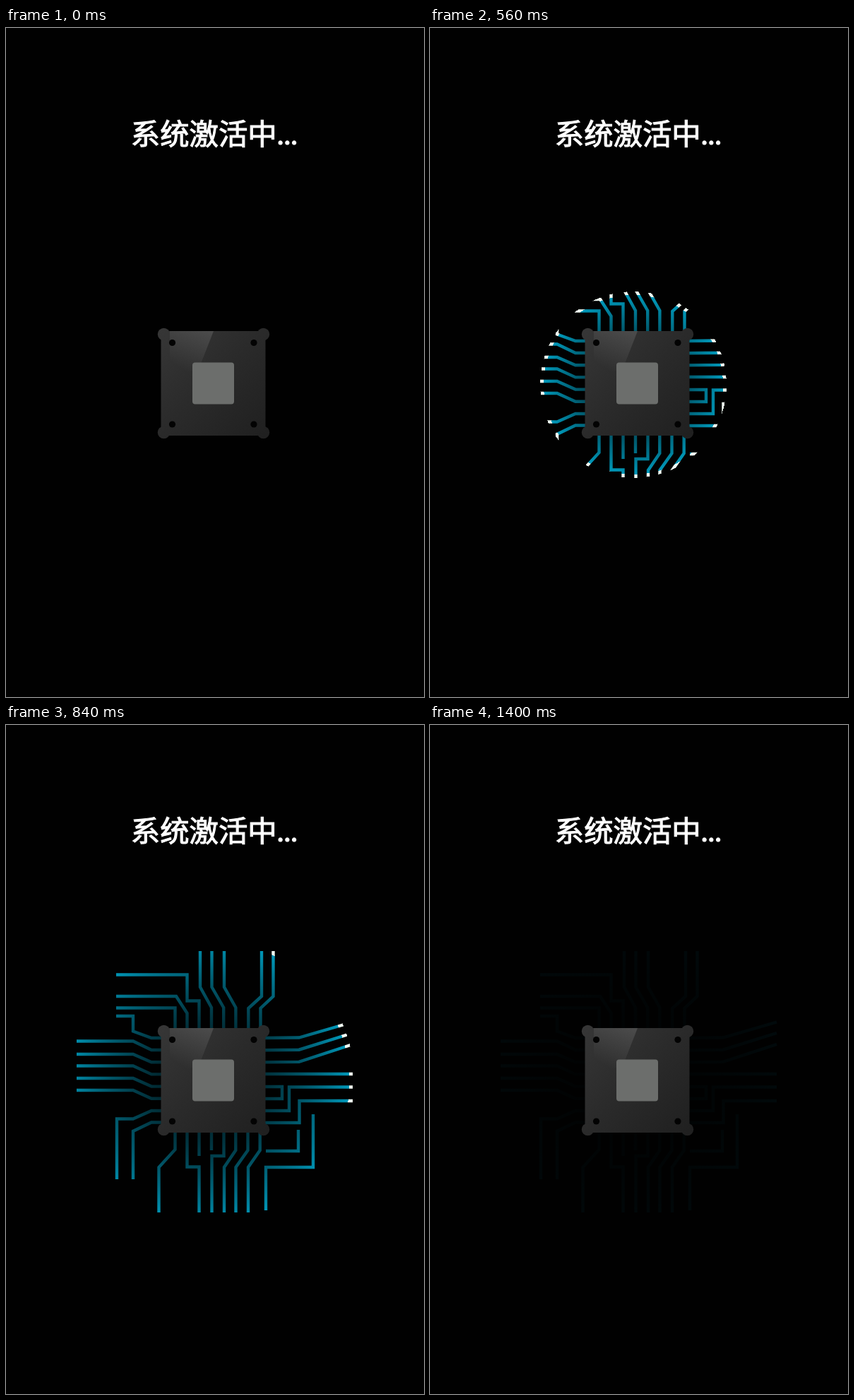
Animation of 592 by 947 pixels, one loop 1440 ms. Source, as an HTML page with a canvas:

```html
<!DOCTYPE html>
<html lang="zh-CN">
<head>
<meta charset="utf-8">
<style>
  html, body { margin: 0; width: 100%; height: 100%; overflow: hidden; background: #010101; }
  canvas { display: block; }
</style>
</head>
<body>
<canvas width="592" height="947"></canvas>
<script>
const ctx = document.querySelector('canvas').getContext('2d');
const LOOP = 1440, STEP = 40, START = 320, FADE = 880, CY = 505;

function buildTraces() {
  const parts = [];
  const add = (...d) => parts.push(...d);
  const pin = (first, i) => first + 17.2 * i;

  // top
  [275, 291.5, 309].forEach((x, i) => add(`M${x} 320V371L${pin(291, i)} 400V430`));
  [362, 378.5].forEach((x, i) => add(`M${x} 320V384L${pin(343.3, i)} 401V430`));
  add('M156 353.5H256.5V390.5H273.5V430',
      'M156 384H241L256.5 408V430',
      'M156 400.5H239.5V430');

  // left
  add('M156 412H180V433.5L206 443H220');
  [447.5, 466, 482.5, 500, 517].forEach((y, i) => add(`M100 ${y}H180L206 ${pin(460, i)}H220`));
  add('M157 643V557.5H180L206 546H220',
      'M180 643V575L206 562.5H220');

  // bottom
  add('M239.5 576V601L216.5 626V690',
      'M256.5 576V625.5H273.5V690',
      'M273.5 576V610',
      'M291 576V602',
      'M308.5 576V610H291.5V690');
  [309, 325.5, 343].forEach((x, i) => add(`M${pin(325.3, i)} 576V602L${x} 626V690`));
  add('M368 687V626H435V551',
      'M368 603H414V573');

  // right
  [420.5, 436, 452].forEach((y, i) => add(`M366 ${pin(443, i)}L415 ${pin(442.5, i)}L491 ${y}`));
  add('M366 494H491',
      'M366 512H391V529H366',
      'M366 546H401V512.5H491',
      'M366 563H415.5V532H491');
  return new Path2D(parts.join(''));
}
const traces = buildTraces();

// Wave front radius after dt ms, and the time at which it reaches a radius
const R0 = 79.5, SPEED = .192, ACCEL = .00011;
const front = dt => R0 + SPEED * dt + ACCEL * dt * dt;
const reached = r => (Math.sqrt(SPEED * SPEED + 4 * ACCEL * (r - R0)) - SPEED) / (2 * ACCEL);

function drawTraces(t) {
  const dt = t - START;
  if (dt < 0) return;
  const r = front(dt), cx = 291 - .0125 * dt;
  const tip = 1 + .03 * r, inner = 70, outer = r - tip;
  const fade = 1 - .9 * Math.max(0, (t - FADE) / (LOOP - FADE)) ** 1.3;
  const wave = ctx.createRadialGradient(cx, CY, 0, cx, CY, r);
  for (let i = 0; i <= 10; i++) {
    const rad = inner + (outer - inner) * i / 10;
    const glow = Math.min(1, Math.exp((reached(rad) - dt) / 420)) * fade;
    wave.addColorStop(rad / r, `rgba(0,160,195,${glow.toFixed(3)})`);
  }
  wave.addColorStop(outer / r, '#f0faf2');
  wave.addColorStop(1, '#f0faf2');
  wave.addColorStop(1, 'rgba(0,0,0,0)');
  ctx.strokeStyle = wave;
  ctx.lineWidth = 4.4;
  ctx.stroke(traces);
}

function gradient(x0, y0, x1, y1, ...colors) {
  const g = ctx.createLinearGradient(x0, y0, x1, y1);
  colors.forEach((c, i) => g.addColorStop(i / (colors.length - 1), c));
  return g;
}

function dots(xs, ys, r) {
  for (const x of xs) for (const y of ys) {
    ctx.beginPath();
    ctx.arc(x, y, r, 0, 7);
    ctx.fill();
  }
}

function drawChip() {
  ctx.fillStyle = gradient(219, 429, 367, 577, '#363636', '#2a2a2a', '#202020');
  dots([223.5, 364.5], [433.5, 572.5], 8.7);
  ctx.fillRect(219.5, 429, 148, 148);

  // glossy reflection
  ctx.fillStyle = gradient(287, 429, 252, 484, 'rgba(255,255,255,.13)', 'rgba(255,255,255,0)');
  ctx.fill(new Path2D('M232 429H294L274 480L232 500Z'));

  ctx.fillStyle = '#030303';
  dots([235.5, 351], [445.5, 561], 4.6);

  ctx.fillStyle = '#6c6e6c';
  ctx.beginPath();
  ctx.roundRect(264, 473.5, 59, 59, 4);
  ctx.fill();
}

// Regular weight thickened by a thin outline gives a medium weight
function drawTitle() {
  const args = ['系统激活中...', 176.8, 165.4];
  ctx.font = '400 41.4px Lato, "Noto Sans CJK SC", "Noto Sans CJK", sans-serif';
  ctx.fillStyle = ctx.strokeStyle = '#fff';
  ctx.lineWidth = 1.1;
  ctx.fillText(...args);
  ctx.strokeText(...args);
}

function frame(now) {
  const t = Math.floor(now % LOOP / STEP) * STEP;
  ctx.fillStyle = '#010101';
  ctx.fillRect(0, 0, 592, 947);
  drawTraces(t);
  drawChip();
  drawTitle();
  requestAnimationFrame(frame);
}
requestAnimationFrame(frame);
</script>
</body>
</html>
```
